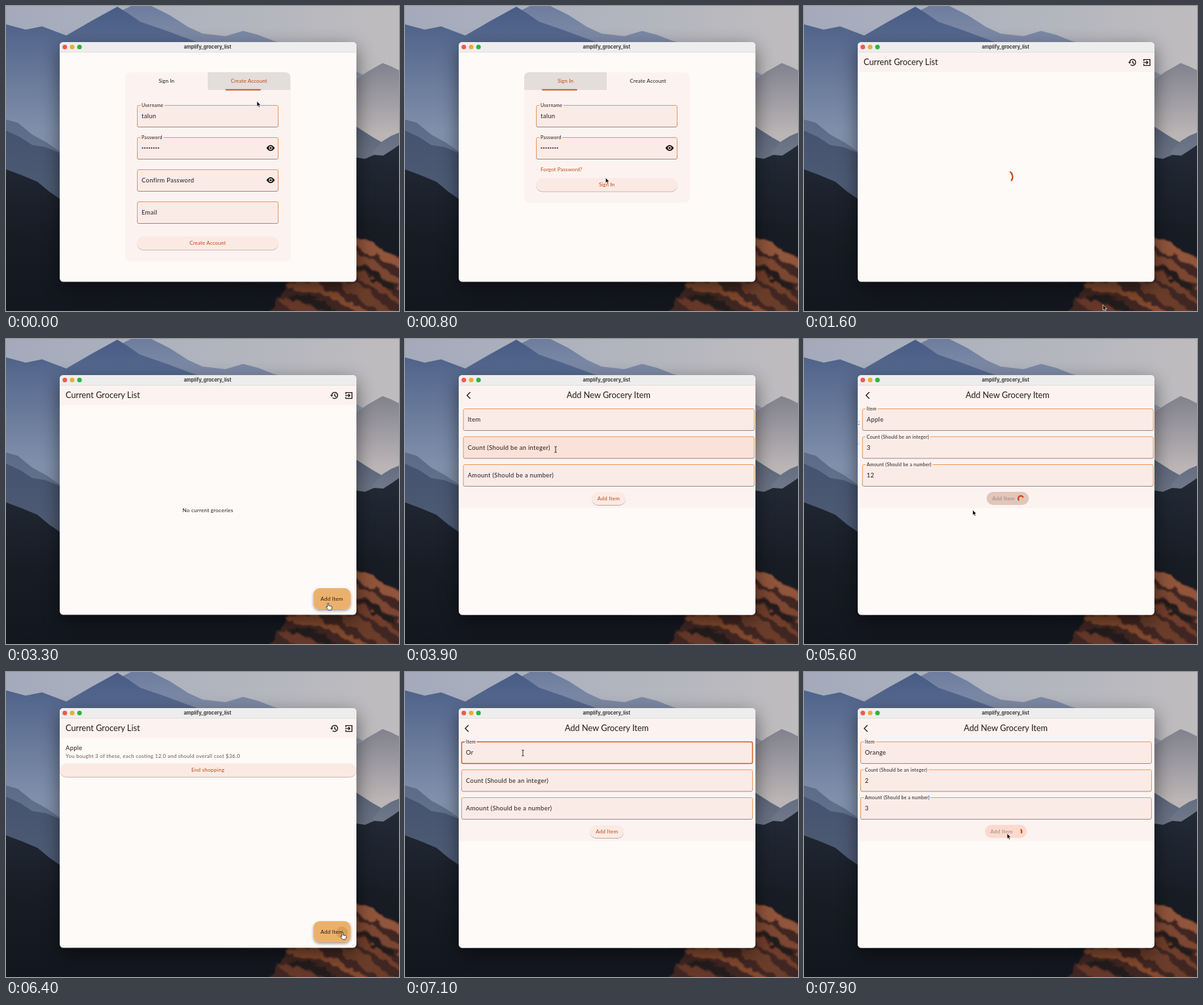
An HTML page for the animation above (8000 ms loop, 600 by 465 pixels).

```html
<!DOCTYPE html>
<html lang="en">
<head>
<meta charset="utf-8">
<title>Grocery list</title>
<style>
  html, body { margin: 0; width: 100%; height: 100%; overflow: hidden; background: #141722; }
  svg { display: block; position: absolute; left: 0; top: 0; }
  text { font-family: Lato, "Open Sans", sans-serif; fill: #251b18; white-space: pre; }
  .head { font-size: 12.75px; }
  .body { font-size: 9.4px; letter-spacing: .33px; }
  .small { font-size: 8px; letter-spacing: .27px; }
  .tab { font-size: 8px; letter-spacing: .1px; }
  .float { font-size: 7px; letter-spacing: .28px; paint-order: stroke; stroke: #fbefec; stroke-width: 4.5px; }
  .bar { font: 700 7.4px Inter, "Open Sans", sans-serif; fill: #3c3a3a; }
  .accent { fill: #c24a12; }
  .muted { fill: #6d5650; }
  .off { fill: #9c867e; }
  .mid { text-anchor: middle; }
  .line { fill: none; stroke: #251b18; stroke-width: 1.4; }
</style>
</head>
<body>
<svg width="600" height="465" viewBox="0 0 600 465">
  <defs>
    <linearGradient id="sky" x2="1" y2=".12">
      <stop stop-color="#a3aabb"/><stop offset=".5" stop-color="#b0b4be"/><stop offset="1" stop-color="#bfbcbe"/>
    </linearGradient>
    <linearGradient id="edge" x2="0" y2="1">
      <stop stop-color="#ec9850"/><stop offset=".8" stop-color="#e0975c"/><stop offset="1" stop-color="#9d877d"/>
    </linearGradient>
    <filter id="soft" x="-20%" y="-20%" width="140%" height="140%"><feGaussianBlur stdDeviation="14"/></filter>
    <filter id="mist"><feGaussianBlur stdDeviation=".5"/></filter>
    <filter id="rough" filterUnits="userSpaceOnUse" x="380" y="320" width="230" height="160">
      <feTurbulence type="fractalNoise" baseFrequency=".07" numOctaves="3" seed="4"/>
      <feDisplacementMap in="SourceGraphic" scale="16" xChannelSelector="R" yChannelSelector="G"/>
      <feGaussianBlur stdDeviation=".9"/>
    </filter>
    <filter id="lift" x="-20%" y="-20%" width="140%" height="160%">
      <feDropShadow dx="0" dy="1" stdDeviation=".7" flood-color="#59392c" flood-opacity=".4"/>
    </filter>
    <filter id="raise" x="-30%" y="-30%" width="160%" height="180%">
      <feDropShadow dx="0" dy="2" stdDeviation="2" flood-opacity=".4"/>
    </filter>
    <clipPath id="frame"><rect x="82" y="55" width="453" height="365.5" rx="5.5"/></clipPath>
  </defs>
  <rect width="600" height="465" fill="url(#sky)"/>
  <g id="hills" filter="url(#mist)"></g>
  <g id="slope" filter="url(#rough)"></g>
  <rect x="82" y="64" width="453" height="364" rx="8" opacity=".5" filter="url(#soft)"/>
  <g clip-path="url(#frame)">
    <rect x="82" y="55" width="453" height="366" fill="#fefaf8"/>
    <g id="pages"></g>
    <rect x="82" y="55" width="453" height="15.5" fill="#ededed"/>
    <path d="M82 70.5H535" stroke="#d6d3d3" stroke-width=".6"/>
    <circle cx="89.8" cy="62.4" r="3.5" fill="#ed5a50"/>
    <circle cx="101" cy="62.4" r="3.5" fill="#e9ae2c"/>
    <circle cx="112.2" cy="62.4" r="3.5" fill="#2cb440"/>
    <text class="bar mid" x="307.7" y="64.8">amplify_grocery_list</text>
  </g>
  <g id="pointer"></g>
</svg>
<script>
const LOOP = 8000, WIDE = 453, SLIDE = 490;
const $ = id => document.getElementById(id);
const clamp = v => Math.min(1, Math.max(0, v));
const smooth = v => v * v * (3 - 2 * v);

// ---- landscape: ridge line, top and bottom of its shading, two colours
const ridges = [
  ['150,20 195,-2 222,0 250,14 278,32 300,42 335,46 362,38 385,44 408,53 470,70 600,130', 0, 120, '#6d7d9f', '#98a0b2'],
  ['0,28 30,36 55,31 92,45 130,23 150,12 170,1 186,11 205,24 240,36 300,58 420,120 500,250', 0, 190, '#475b84', '#8090ab'],
  ['500,130 535,112 552,100 575,87 588,92 600,98', 85, 195, '#80818e', '#bbb5b5'],
  ['500,160 535,184 560,200 585,214 600,220', 180, 235, '#586377', '#6d7585'],
  ['560,222 575,206 588,198 600,193', 190, 230, '#646d80', '#70798a'],
  ['0,173 18,178 40,196 62,208 82,222 200,290', 170, 240, '#5b6a87', '#66748e'],
  ['0,190 22,200 40,212 60,215 82,224 200,310', 188, 275, '#46536f', '#4d5a73'],
  ['0,249 24,258 48,268 66,283 82,294 200,350 420,360 500,250 535,231 548,233 562,227 576,228 590,219 600,212', 215, 350, '#222a36', '#171c25'],
  ['0,340 40,352 82,376 200,410 400,425 520,340 537,325 552,330 566,323 580,335 600,330', 320, 465, '#191d25', '#13161f']
];
const slope = [
  ['400,475 416,442 432,420 500,385 535,350 555,358 578,370 610,388 610,475', '#3f2820'],
  ['530,350 552,358 578,372 610,392 610,404 566,382 530,366', '#90543a'],
  ['530,376 562,388 610,424 610,436 552,398 530,388', '#7b4631'],
  ['530,402 560,416 610,452 610,461 556,425 530,412', '#6f3e2c'],
  ['425,424 470,421 520,447 552,468 535,468 482,437 440,433', '#82492f'],
  ['500,420 535,420 595,470 572,470 530,438', '#6b3c2a'],
  ['414,446 438,444 484,470 440,470', '#66392a'],
  ['535,396 556,400 600,434 580,430', '#221a1b'],
  ['430,440 470,442 512,470 492,470', '#241b1c']
];
const ends = line => [line.split(' ').pop().split(',')[0], line.split(',')[0]];
$('hills').innerHTML = ridges.map(([line, top, low, a, b], i) => `
  <linearGradient id="r${i}" gradientUnits="userSpaceOnUse" x1="0" x2="0" y1="${top}" y2="${low}">
    <stop stop-color="${a}"/><stop offset="1" stop-color="${b}"/></linearGradient>
  <polygon points="${line} ${ends(line)[0]},470 ${ends(line)[1]},470" fill="url(#r${i})"/>`).join('');
$('slope').innerHTML = slope.map(([p, c]) => `<polygon points="${p}" fill="${c}"/>`).join('');

// ---- small parts
const text = (x, y, s, cls) => `<text x="${x}" y="${y}" class="${cls}">${s}</text>`;
const box = (x, y, w, h, fill, rx = 0, more = '') =>
  `<rect x="${x}" y="${y}" width="${w}" height="${h}" rx="${rx}" fill="${fill}" ${more}/>`;
const pill = (x, y, w, h, fill = '#fbeae4') => box(x, y, w, h, fill, h / 2, 'filter="url(#lift)"');

function field(x, y, w, label, value = '', { focus = false, hover = false } = {}) {
  const up = focus || value;
  return box(x + .5, y + .5, w - 1, 33, hover ? '#fae2da' : '#faebe7', 2.2,
      `stroke="${focus ? '#cf5a1c' : 'url(#edge)'}" stroke-width="${focus ? 1.4 : 1}"`) +
    (up ? text(x + 7, y + 3.2, label, 'float') : text(x + 7, y + 20, label, 'body')) +
    text(x + 7, y + 20, value, 'body');
}

const eye = y => `<path d="M397.6 ${y}q6.4-9 12.8 0q-6.4 9-12.8 0z" fill="#1b1412"/>
  <circle cx="404" cy="${y}" r="2.7" fill="#faebe7"/><circle cx="404" cy="${y}" r="1.6" fill="#1b1412"/>`;

const dots = (x, y) => Array.from({ length: 8 }, (_, i) =>
  `<circle cx="${x + i * 3.45}" cy="${y}" r="1.1" fill="#251b18"/>`).join('');

function spinner(cx, cy, r, width, age) {
  const turn = Math.floor(age / 1333), u = age / 1333 - turn;
  const ease = v => Math.sin(clamp(v) * Math.PI / 2);
  const tail = ease(2 * u - 1), sweep = Math.max(8, 270 * (ease(2 * u) - tail));
  const from = -85 + .2 * age + 270 * (turn + tail);
  const at = deg => {
    const a = deg * Math.PI / 180;
    return `${cx + r * Math.cos(a)} ${cy + r * Math.sin(a)}`;
  };
  return `<path d="M${at(from)}A${r} ${r} 0 ${sweep > 180 ? 1 : 0} 1 ${at(from + sweep)}"
    fill="none" stroke="#d24a15" stroke-width="${width}"/>`;
}

// ---- pages
function authPage(t) {
  const signIn = t >= 450;
  const tabX = signIn ? 182 : 308;
  const corner = signIn
    ? 'M182 128V109q0-8 8-8H308V128z' : 'M308 101H426q8 0 8 8V128H308z';
  const lower = signIn
    ? text(207, 252, 'Forgot Password?', 'tab accent') + pill(200, 262, 216, 20.5) + text(308, 275, 'Sign In', 'tab accent mid')
    : field(200, 249, 216, 'Confirm Password') + eye(265.5) + field(200, 298, 216, 'Email') +
      pill(200, 351, 216, 20.5) + text(308, 364.2, 'Create Account', 'tab accent mid');
  return box(182, 101, 253, signIn ? 199 : 288.5, '#fcf3f1', 8) +
    `<path d="${corner}" fill="#e3dddb"/>` + box(tabX + 27, 126.8, 54, 2, '#d0561f', 1) +
    text(245, 117.3, 'Sign In', 'tab mid' + (signIn ? ' accent' : '')) +
    text(371, 117.3, 'Create Account', 'tab mid' + (signIn ? '' : ' accent')) +
    field(200, 151, 216, 'Username', 'talun') +
    field(200, 200, 216, 'Password', ' ') + dots(208.5, 216.5) + eye(216.5) + lower;
}

const homeIcons = `<g class="line">
  <path d="M497.2 86a4.6 4.6 0 1 1 1.5 3.4M501.8 83.4v3l2.2 1.4"/>
  <path d="M494.8 85.4h4.8l-2.4 2.6z" fill="#251b18" stroke="none"/>
  <path d="M518.8 84v-2.4h9.4v9h-9.4v-2.4M517.8 86.1h7M522.6 83.7l2.4 2.4-2.4 2.4"/></g>`;

function homePage(t) {
  let out = box(82, 70, WIDE, 31, '#fcf3f1') + text(91, 90.3, 'Current Grocery List', 'head') + homeIcons;
  if (t < 2700) return out + spinner(308.5, 260.5, 10, 2.3, t - 1450);
  if (t < 5600) out += text(308.3, 263.6, 'No current groceries', 'small mid');
  else out += text(91, 119, 'Apple', 'body') +
    text(91, 130.6, 'You bought 3 of these, each costing 12.0 and should overall cost $36.0', 'small muted') +
    pill(82, 139.3, WIDE, 20.4) + text(308.3, 152.4, 'End shopping', 'small accent mid');
  out += box(469.5, 380, 56.5, 32, '#ebb16c', 9, 'filter="url(#raise)"');
  if (t > 6330 && t < 6700) out += '<circle cx="513" cy="397" r="9" fill="#b9863f" opacity=".4"/>';
  return out + text(497.5, 398.6, 'Add Item', 'small mid');
}

// Each visit: opening, loading and closing times, then [value, focus time, first key time]
const visits = [
  { open: 3500, load: 4830, close: 5600, keys: [['Apple', 4070, 4150], ['3', 4450, 4510], ['12', 4590, 4640]] },
  { open: 6450, load: 7750, close: 9000, keys: [['Orange', 6950, 7020], ['2', 7330, 7390], ['3', 7470, 7530]] }
];
const labels = ['Item', 'Count (Should be an integer)', 'Amount (Should be a number)'];

function formPage(t, { load, keys }) {
  const active = t < load ? keys.filter(k => t >= k[1]).length - 1 : -1;
  const rows = keys.map(([word, , start], i) => field(86, [106, 148.5, 191][i], 445, labels[i],
    word.slice(0, Math.max(0, Math.floor((t - start) / 55) + 1)),
    { focus: i === active, hover: i === 1 && t > 3820 && t < 3960 })).join('');
  const button = t >= load
    ? box(276, 233, 64.5, 20, t - load < 200 ? '#fbdacd' : '#e2c6b9', 10) +
      text(284.5, 246, 'Add Item', 'small off') + spinner(328.3, 243.2, 4, 2.4, t - load)
    : pill(282.3, 233.3, 52, 19.6) + text(308.3, 246, 'Add Item', 'small accent mid');
  return box(82, 70, WIDE, 351, '#fefaf8') + box(82, 70, WIDE, 188, '#fcf3f1') +
    '<path class="line" d="M97 81l-5 5 5 5" stroke-width="1.8"/>' +
    text(308, 90.3, 'Add New Grocery Item', 'head mid') + rows + button;
}

function pages(t) {
  if (t < 1450) return authPage(t);
  const visit = visits.find(v => t >= v.open && t < v.close + SLIDE);
  if (!visit) return homePage(t);
  const left = s => (1 - clamp((t - s) / SLIDE)) ** 3;
  const shift = WIDE * (t < visit.close ? left(visit.open) : 1 - left(visit.close));
  return `<g transform="translate(${(shift - WIDE) / 3})">${homePage(t)}</g>
    <g transform="translate(${shift})">${formPage(t, visit)}</g>`;
}

// ---- pointer: time, x, y, shape from that time on
const track = [
  [0, 383, 145, 'arrow'], [180, 383, 145, 'arrow'], [400, 246, 114, 'hand'], [520, 246, 114, 'arrow'],
  [850, 310, 271, 'hand'], [1020, 310, 271, 'arrow'], [1500, 456.3, 455.5, 'arrow'], [2500, 456.3, 455.5, 'arrow'],
  [2950, 495, 398, 'hand'], [3300, 492, 403, 'hand'], [3540, 492, 403, 'arrow'], [3840, 236, 174, 'beam'],
  [3900, 230, 168, 'beam'], [4040, 180, 123, 'beam'], [4480, 180, 123, 'arrow'], [4760, 310, 245, 'hand'],
  [4850, 310, 245, 'arrow'], [5080, 257.5, 260.5, 'arrow'], [5750, 257.5, 260.5, 'arrow'],
  [6250, 514, 397.5, 'hand'], [6520, 514, 397.5, 'arrow'], [6900, 180, 123, 'beam'],
  [7350, 180, 123, 'arrow'], [7680, 310, 246, 'hand'], [7770, 310, 246, 'arrow'], [LOOP, 310, 246, 'arrow']
];
const shapes = {
  arrow: '<path d="M0 0V8.4L1.9 6.7 3.2 9.6 4.7 8.9 3.4 6.1H6z" fill="#0c0b0b" stroke="#fff" stroke-width=".7"/>',
  hand: `<path d="M-1.2 1q0-1.2 1-1.2t1 1.2v2.6l4 .9q1.1.3 1 1.6l-.6 2.6-.9 1.6H.1L-3 6.6q-.8-1 0-1.5.6-.3 1.8.8z"
    fill="#fff" stroke="#181414" stroke-width=".8"/>`,
  beam: '<path d="M-1.8-4Q0-4 0-3Q0-4 1.8-4M0-3V4M-1.8 5Q0 5 0 4Q0 5 1.8 5" fill="none" stroke="#1b1513" stroke-width=".9"/>'
};

function pointer(t) {
  const i = track.findIndex(k => k[0] > t);
  const [t0, x0, y0, shape] = track[i - 1], [t1, x1, y1] = track[i];
  const p = smooth((t - t0) / (t1 - t0));
  return `<g transform="translate(${x0 + (x1 - x0) * p} ${y0 + (y1 - y0) * p})">${shapes[shape]}</g>`;
}

const began = performance.now();
function draw() {
  const t = Math.max(0, performance.now() - began) % LOOP;
  $('pages').innerHTML = pages(t);
  $('pointer').innerHTML = pointer(t);
  requestAnimationFrame(draw);
}
draw();
</script>
</body>
</html>
```
